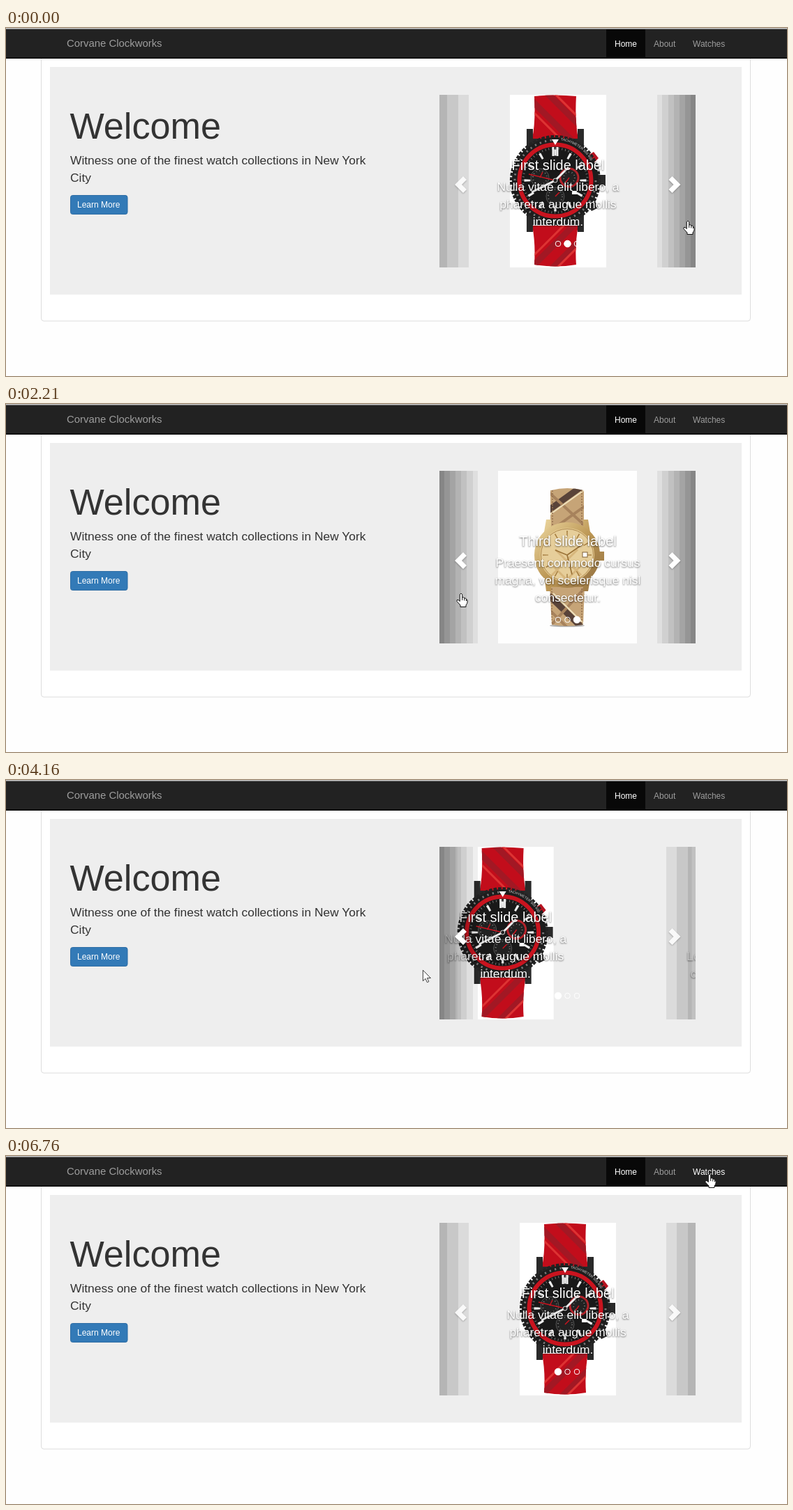
An HTML page that plays this animation: 1119 px wide and 500 px high, repeating every 8000 ms.

```html
<!DOCTYPE html>
<html lang="en">
<head>
<meta charset="utf-8">
<title>Watch shop carousel</title>
<style>
  html, body { margin: 0; width: 100%; height: 100%; overflow: hidden; background: #fefefe; }
  svg { display: block; width: 100vw; height: 100vh; font-family: "Liberation Sans", Arial, sans-serif; }
  .nav { font-size: 12px; fill: #9d9d9d; }
  .lead { font-size: 17.4px; fill: #333; }
  .caption { fill: #fff; text-anchor: middle; font-size: 17.4px; filter: drop-shadow(0 1px 1px rgba(0, 0, 0, .6)); }
  .caption .title { font-size: 19.9px; }
  .chevron { fill: #fff; filter: drop-shadow(0 1px 1px rgba(0, 0, 0, .3)); }
  .ring { fill: none; }
</style>
</head>
<body>
<svg viewBox="0 0 1119 500">
  <defs>
    <clipPath id="stage"><rect x="621" y="96" width="367" height="248"/></clipPath>
    <clipPath id="redStraps"><path d="M771 98Q801 95 831 98Q829 135 834 159H768Q773 135 771 98M768 284H834Q829 310 831 340Q801 345 771 340Q773 310 768 284"/></clipPath>
    <clipPath id="tanStraps"><path d="M781 124Q804 118 828 124V176H780V124M779 262H829L827 317Q804 321 782 317Z"/></clipPath>
    <clipPath id="silverDial"><circle cx="805" cy="217" r="37"/></clipPath>
    <linearGradient id="steel">
      <stop stop-color="#777"/><stop offset=".13" stop-color="#ddd"/><stop offset=".27" stop-color="#999"/>
      <stop offset=".32" stop-color="#f2f2f2"/><stop offset=".68" stop-color="#ddd"/><stop offset=".74" stop-color="#888"/>
      <stop offset=".87" stop-color="#e2e2e2"/><stop offset="1" stop-color="#777"/>
    </linearGradient>
    <linearGradient id="gold" x2="1" y2="1">
      <stop stop-color="#ead49c"/><stop offset=".5" stop-color="#bd9856"/><stop offset="1" stop-color="#937040"/>
    </linearGradient>
    <linearGradient id="rim" x2="1" y2="1">
      <stop stop-color="#ddd"/><stop offset=".5" stop-color="#929292"/><stop offset="1" stop-color="#bbb"/>
    </linearGradient>
    <path id="bezelArc" d="M805 161A58 58 0 0 1 859 215"/>
    <path id="chevron" d="M655 213L660 218L653 225L660 232L655 237L643 225Z"/>
  </defs>

  <path fill="#ccc" d="M0 0H1119V2H0Z"/>
  <path fill="#fff" stroke="#ddd" d="M50.5 40V417Q50.5 421 54 421H1063Q1066.5 421 1066.5 417V40"/>
  <path fill="#222" d="M0 1.5H1119V44H0Z"/>
  <path fill="#080808" d="M0 42.5H1119V44H0ZM860 2H916V44H860Z"/>
  <text x="87" y="27" font-size="14.9" fill="#9d9d9d">Corvane Clockworks</text>
  <g class="nav">
    <text x="872" y="26.5" fill="#fff">Home</text>
    <text x="928" y="26.5">About</text>
    <text x="984" y="26.5" id="watchesLink">Watches</text>
  </g>

  <rect x="63" y="56" width="991" height="327" fill="#eee"/>
  <text x="91.5" y="159" font-size="52.2" fill="#333">Welcome</text>
  <text class="lead" x="92" y="196">Witness one of the finest watch collections in New York</text>
  <text class="lead" x="92" y="221">City</text>
  <rect x="92.5" y="240.5" width="81.5" height="27" rx="3" fill="#337ab7" stroke="#2e6da4"/>
  <text x="102" y="258" font-size="12" fill="#fff">Learn More</text>

  <g clip-path="url(#stage)">
    <g class="slide">
      <rect x="736" y="96" width="138" height="248" fill="#fff"/>
      <g clip-path="url(#redStraps)">
        <rect x="760" y="96" width="80" height="248" fill="#c20d1b"/>
        <path stroke="#a21824" stroke-width="9" d="M765 102L825 162M788 92L848 152M765 346L836 275M790 352L850 292"/>
        <path stroke="#d33" stroke-width="3" d="M765 116L810 161M800 94L840 134M765 332L815 282M800 348L840 308"/>
      </g>
      <path fill="#292929" d="M760 145H769V159H833V145H842V180H760ZM760 258H842V293H833V283H769V293H760ZM860 211H873V227H860ZM848 255L858 249L863 258L853 263Z"/>
      <path fill="#b71320" d="M847 184L856 178L863 187L857 193Z"/>
      <g transform="translate(801 219)">
        <circle r="62" fill="#1d1d1d"/>
        <circle class="ring" r="63" stroke="#222" stroke-width="4" pathLength="60" stroke-dasharray=".7 .3"/>
        <circle class="ring" r="58" stroke="#777" stroke-width="3" pathLength="48" stroke-dasharray=".3 .7"/>
        <path d="M0-58A58 58 0 0 1 58 0" class="ring" stroke="#1d1d1d" stroke-width="6"/>
        <circle class="ring" r="51.5" stroke="#c9141f" stroke-width="6"/>
        <circle r="48" fill="#191919"/>
        <circle class="ring" r="46" stroke="#999" stroke-width="3" pathLength="60" stroke-dasharray=".15 .85"/>
        <circle class="ring" r="40" stroke="#eee" stroke-width="9" pathLength="12" stroke-dasharray=".15 .85" stroke-dashoffset=".075"/>
        <g fill="#222" stroke="#555">
          <circle cx="-22" cy="-4" r="13"/><circle cy="23" r="13"/>
          <circle cx="20" cy="-4" r="13" stroke="#b4232a" stroke-width="3"/>
        </g>
        <g class="ring" stroke="#aaa" stroke-width="2" stroke-dasharray=".6 4">
          <circle cx="-22" cy="-4" r="10"/><circle cx="20" cy="-4" r="8"/><circle cy="23" r="10"/>
        </g>
        <path stroke="#c9141f" stroke-width="1.5" d="M0 0L-38-9M20-4L15 3M-22-4L-18-12M0 23L6 17"/>
        <path stroke="#eee" stroke-width="3" d="M0 0L-34 17M0 0L19-19M-3-48V-35M3-48V-35"/>
        <path fill="#fff" d="M-5-59H5L0-51ZM24 15H31V20H24Z"/>
        <circle r="3" fill="#222" stroke="#ddd"/>
      </g>
      <text font-size="5" fill="#ddd"><textPath href="#bezelArc" startOffset="4">TACHYMETER 500 400</textPath></text>
    </g>

    <g class="slide">
      <rect x="705" y="96" width="199" height="248" fill="#fefefe"/>
      <ellipse cx="805" cy="318.5" rx="43" ry="1.6" fill="#333"/>
      <path fill="url(#steel)" stroke="#888" stroke-width=".7" d="M783 123Q805 118 827 123L829 155L836 177H774L780 155ZM775 258H835L829 282L828 317Q805 320 782 317L780 282Z"/>
      <path stroke="#777" d="M782 133H828M781 147H829M793 127H817M793 154H817M780 277H830M781 291H829M782 305H828M793 284H817M793 298H817"/>
      <path fill="#222" d="M780 155H792V160H778ZM818 155H829L831 160H818ZM778 272H792V276H780ZM818 272H832L830 276H818ZM850 215H857V227H850Z"/>
      <circle cx="805" cy="217" r="42.5" fill="#efefef" stroke="url(#rim)" stroke-width="8"/>
      <circle cx="805" cy="217" r="37.5" fill="#e9e9e9" stroke="#777"/>
      <g clip-path="url(#silverDial)" stroke="#cfcfcf" stroke-width="3">
        <path d="M770 222L812 264M782 210L830 258M800 205L850 255M840 220L798 262M828 208L780 256M808 204L762 250"/>
      </g>
      <circle class="ring" cx="805" cy="217" r="31" stroke="#777" stroke-width="8" pathLength="12" stroke-dasharray=".09 .91" stroke-dashoffset=".045"/>
      <text x="805" y="205" font-size="5.5" font-weight="bold" fill="#333" text-anchor="middle" font-family="Liberation Serif, serif">MELVANTE</text>
      <path stroke="#888" stroke-width="1.5" d="M805 217L788 226M805 217L827 201M805 217L815 243"/>
      <rect x="826" y="213" width="7" height="7" fill="#fff" stroke="#777"/>
    </g>

    <g class="slide">
      <rect x="705" y="96" width="199" height="248" fill="#fefefe"/>
      <ellipse cx="804" cy="318.5" rx="25" ry="1.8" fill="#aaa"/>
      <g clip-path="url(#tanStraps)">
        <rect x="770" y="115" width="70" height="210" fill="#c6a477"/>
        <path stroke="#594339" stroke-width="9" d="M774 155L831 114M778 275L834 330"/>
        <path stroke="#a7825c" stroke-width="4" d="M776 125L835 180M779 320L833 260M790 175L840 139M775 292L810 327"/>
        <path stroke="#eee0bc" stroke-width="2" d="M772 164L832 121M784 272L834 322"/>
        <path class="ring" stroke="#94704d" stroke-width="1.5" stroke-dasharray="2 2" d="M783 120V174M825 120V174M782 265V318M825 265V318"/>
      </g>
      <path fill="url(#gold)" d="M774 166H781V178H827V166H834L838 190H770ZM771 246H838L834 269H827V263H781V269H774ZM849 212H857V225H849Z"/>
      <circle cx="804" cy="217" r="43" fill="#e4c98f" stroke="url(#gold)" stroke-width="8"/>
      <circle cx="804" cy="217" r="37.5" fill="#e6ce9a" stroke="#ae8950"/>
      <path stroke="#d7b67c" stroke-width="3" d="M776 225L803 252M787 209L824 246M832 224L804 252M819 209L782 246"/>
      <circle class="ring" cx="804" cy="217" r="31" stroke="#a47b3e" stroke-width="8" pathLength="12" stroke-dasharray=".09 .91" stroke-dashoffset=".045"/>
      <path stroke="#9b7338" stroke-width="1.7" d="M804 217L787 210M804 217L827 201M804 217L811 245"/>
      <rect x="826" y="213" width="7" height="7" fill="#fff" stroke="#806036"/>
    </g>
  </g>

  <g id="leftShade"></g>
  <g id="rightShade" transform="matrix(-1 0 0 1 1609 0)"></g>
  <use href="#chevron" class="chevron" id="leftArrow"/>
  <use href="#chevron" class="chevron" id="rightArrow" transform="matrix(-1 0 0 1 1609.5 0)"/>
  <g stroke="#fff">
    <circle class="dot" cx="791" cy="310"/><circle class="dot" cx="804.5" cy="310"/><circle class="dot" cx="818" cy="310"/>
  </g>

  <g id="cursor" fill="#fff" stroke="#111" stroke-linejoin="round">
    <path id="pointer" stroke-width=".8" d="M0 0V15.5L3.6 12.2L6 17.5L8.4 16.5L6 11.3H11Z"/>
    <g id="hand">
      <path d="M-1.7 1.5Q0-1 1.7 1.5V6Q4 5 5 7Q7 6.5 7.5 8.5Q9.5 8.5 9.2 12Q9 15 7 17V19.5H-1V17L-6 11.5Q-6.5 8.5-4 9.5L-1.7 11.5Z"/>
      <path d="M1.7 6V10M4.8 7V10.5M7.5 8.5V11"/>
    </g>
  </g>
</svg>

<script>
const LOOP = 8000, STEP = 130, WIDTH = 367, SLIDE_TIME = 600;
const $ = id => document.getElementById(id);

const captions = [
  ["First slide label", "Nulla vitae elit libero, a", "pharetra augue mollis", "interdum."],
  ["Second slide label", "Lorem ipsum dolor sit amet,", "consectetur adipiscing elit."],
  ["Third slide label", "Praesent commodo cursus", "magna, vel scelerisque nisl", "consectetur."]
];
const moves = [
  { start: -83, from: 0, to: 1 },
  { start: 905, from: 1, to: 2 },
  { start: 2840, from: 2, to: 1 },
  { start: 3765, from: 1, to: 0 }
];
// time, x, y of the pointer tip
const path = [
  [0, 977, 277], [1300, 977, 277], [1430, 955, 280], [1690, 815, 282], [1820, 740, 276],
  [1950, 683, 273], [2080, 656, 272], [2210, 652, 272], [2470, 645, 272], [3900, 645, 272],
  [4550, 526, 275], [4680, 456, 270], [4940, 792, 155], [5460, 903, 115], [6240, 1010, 14],
  [6370, 1008, 26], [LOOP, 1008, 26]
];

const slides = [...document.querySelectorAll(".slide")];
const dots = [...document.querySelectorAll(".dot")];

slides.forEach((slide, i) => {
  const [title, ...lines] = captions[i];
  const bodyTop = 284 - 25 * (lines.length - 1);
  slide.insertAdjacentHTML("beforeend", `<g class="caption">
    <text class="title" x="805" y="${bodyTop - 30}">${title}</text>
    ${lines.map((line, n) => `<text x="805" y="${bodyTop + 25 * n}">${line}</text>`).join("")}</g>`);
});

function bands(edges, darkest) {
  const count = edges.length - 1;
  return "<g>" + edges.slice(0, count).map((x, i) =>
    `<rect x="${x}" y="96" width="${edges[i + 1] - x}" height="248" opacity="${darkest * (1 - i / count)}"/>`).join("") + "</g>";
}
for (const id of ["leftShade", "rightShade"])
  $(id).innerHTML = bands([621, 632, 648, 663], .24) + bands([621, 628, 636, 644, 652, 660, 669, 676], .44);

// cubic-bezier(.42, 0, .58, 1)
function easeInOut(p) {
  if (p <= 0 || p >= 1) return p <= 0 ? 0 : 1;
  let low = 0, high = 1, s;
  for (let i = 0; i < 20; i++) {
    s = (low + high) / 2;
    const x = 1.26 * s * (1 - s) ** 2 + 1.74 * s * s * (1 - s) + s ** 3;
    if (x < p) low = s; else high = s;
  }
  return s * s * (3 - 2 * s);
}

function cursorAt(t) {
  const i = path.findIndex(key => key[0] > t);
  const [t0, x0, y0] = path[i - 1], [t1, x1, y1] = path[i];
  const k = (t - t0) / (t1 - t0);
  return [x0 + (x1 - x0) * k, y0 + (y1 - y0) * k];
}

const show = (node, visible) => node.style.display = visible ? "" : "none";

function setControl(side, hover) {
  const [plain, dark] = $(side + "Shade").children;
  show(plain, !hover);
  show(dark, hover);
  dark.style.opacity = hover;
  $(side + "Arrow").style.opacity = hover ? 1 : .85;
}

function draw(t) {
  const { start, from, to } = moves.findLast(move => move.start <= t);
  const eased = easeInOut((t - start) / SLIDE_TIME), direction = to - from;
  slides.forEach((slide, i) => {
    const shift = i === from ? -eased : 1 - eased;
    show(slide, i === to || (i === from && eased < 1));
    slide.setAttribute("transform", `translate(${shift * direction * WIDTH} 0)`);
  });
  dots.forEach((dot, i) => {
    dot.setAttribute("r", i === to ? 4.8 : 3.8);
    dot.setAttribute("fill", i === to ? "#fff" : "none");
  });

  setControl("right", t < 2860 ? 1 : 0);
  setControl("left", t < 2080 || t >= 6500 ? 0 : t < 4290 ? 1 : .75);

  const [x, y] = cursorAt(t);
  const onNav = y < 44, onControl = y > 96 && (x > 933 || (x > 621 && x < 676));
  show($("hand"), onNav || onControl);
  show($("pointer"), !(onNav || onControl));
  $("cursor").setAttribute("transform", `translate(${x} ${y})`);
  $("watchesLink").style.fill = onNav && x > 972 ? "#fff" : "";
}

function tick() {
  const t = performance.now() % LOOP;
  draw(Math.floor(t / STEP) * STEP);
  requestAnimationFrame(tick);
}
tick();
</script>
</body>
</html>
```
